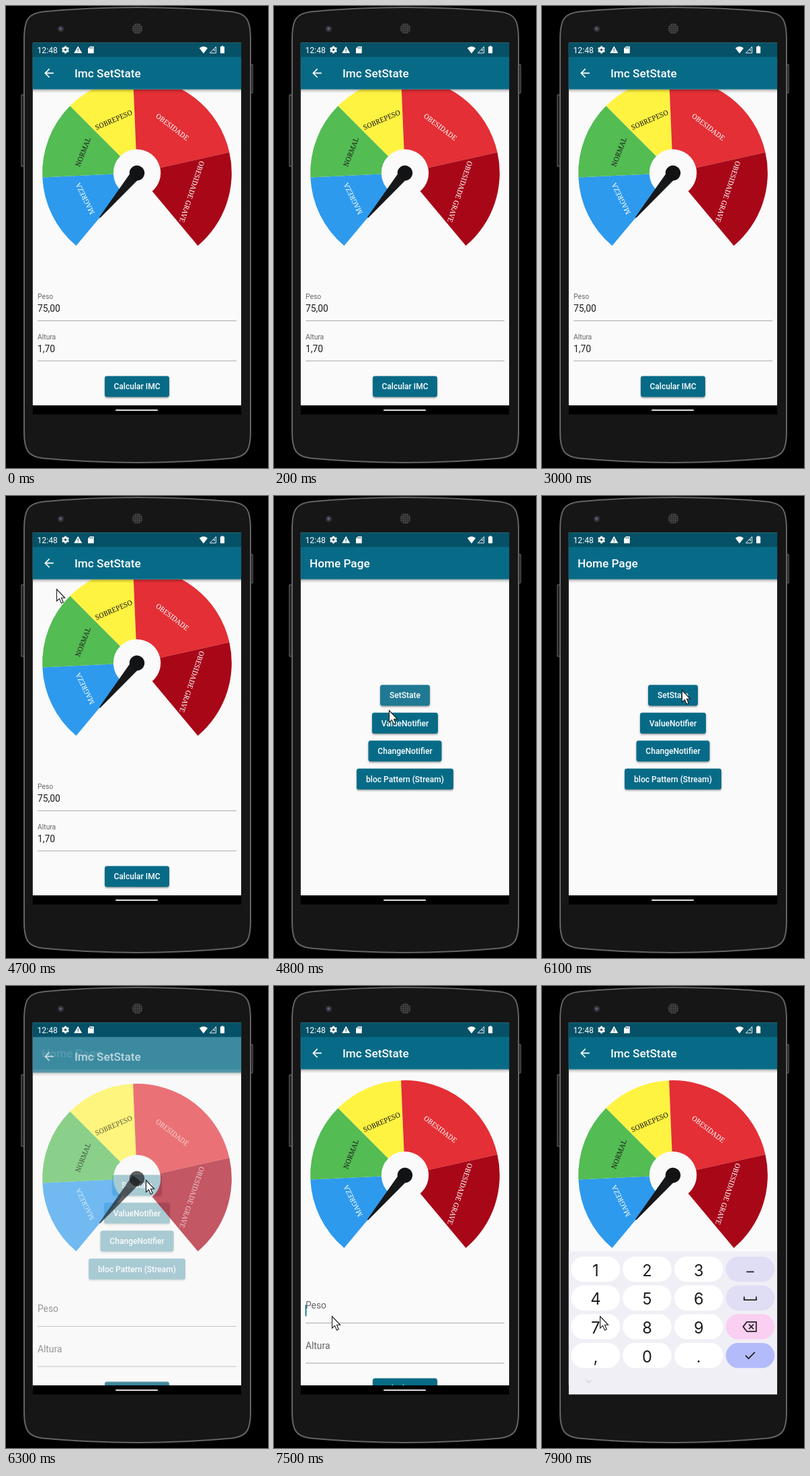
Animation of 390x686 px, one loop 8000 ms. Source, as an HTML page with a canvas:

```html
<!DOCTYPE html>
<html lang="pt">
<head>
<meta charset="utf-8">
<title>IMC</title>
<style>
html, body { margin: 0; width: 100%; height: 100%; overflow: hidden; background: #000; }
canvas { display: block; width: 390px; height: 686px; }
</style>
</head>
<body>
<canvas id="stage"></canvas>
<script>
const W = 390, H = 686, LOOP = 8000, STEP = 100;
const canvas = document.getElementById('stage');
const ratio = window.devicePixelRatio || 1;
canvas.width = W * ratio;
canvas.height = H * ratio;
const ctx = canvas.getContext('2d');

const TEAL = '#076b87', STATUS = '#055167', PAPER = '#fafafa', INK = '#1c1c1c';
const SCREEN = { x: 39.6, y: 54.4, w: 310.6, h: 552 };
const BAR_END = 123.7;
const rad = deg => deg * Math.PI / 180;
const clamp = v => Math.max(0, Math.min(1, v));
const easeOut = v => 1 - (1 - v) ** 3;
const mix = (a, b, p) => a + (b - a) * p;

function rect(x, y, w, h, color) {
  ctx.fillStyle = color;
  ctx.fillRect(x, y, w, h);
}

function band(y, h, color) {
  rect(SCREEN.x, y, SCREEN.w, h, color);
}

function roundRect(x, y, w, h, r, color) {
  ctx.beginPath();
  ctx.roundRect(x, y, w, h, r);
  ctx.fillStyle = color;
  ctx.fill();
}

function disc(x, y, r, color) {
  ctx.beginPath();
  ctx.arc(x, y, r, 0, 7);
  ctx.fillStyle = color;
  ctx.fill();
}

function polygon(points, color) {
  ctx.beginPath();
  points.forEach(([x, y]) => ctx.lineTo(x, y));
  ctx.closePath();
  ctx.fillStyle = color;
  ctx.fill();
}

function polyline(points, color, width) {
  ctx.beginPath();
  points.forEach(([x, y]) => ctx.lineTo(x, y));
  ctx.strokeStyle = color;
  ctx.lineWidth = width;
  ctx.stroke();
}

function text(str, x, y, size, color, { weight = 400, align = 'left', family = 'Roboto, sans-serif' } = {}) {
  ctx.font = `${weight} ${size}px ${family}`;
  ctx.textAlign = align;
  ctx.fillStyle = color;
  ctx.fillText(str, x, y);
}

function clipped(x, y, w, h, draw) {
  ctx.save();
  ctx.beginPath();
  ctx.rect(x, y, w, h);
  ctx.clip();
  draw();
  ctx.restore();
}

// Phone body

function drawPhone() {
  rect(0, 0, W, H, '#000');
  roundRect(22, 131, 7, 108, 2, '#4a4a4a');
  roundRect(23.5, 133, 3, 104, 1, '#222');
  roundRect(361, 86, 7, 44, 2, '#4a4a4a');
  roundRect(364, 88, 2.5, 40, 1, '#222');

  ctx.beginPath();
  ctx.moveTo(27, 50);
  ctx.bezierCurveTo(27, 20, 33, 11, 55, 8.5);
  ctx.quadraticCurveTo(195.5, -4.5, 336, 8.5);
  ctx.bezierCurveTo(358, 11, 364, 20, 364, 50);
  ctx.lineTo(364, 632);
  ctx.bezierCurveTo(364, 660, 358, 669, 336, 671.5);
  ctx.quadraticCurveTo(195.5, 684.5, 55, 671.5);
  ctx.bezierCurveTo(33, 669, 27, 660, 27, 632);
  ctx.closePath();
  ctx.fillStyle = '#161616';
  ctx.fill();
  ctx.strokeStyle = '#646464';
  ctx.lineWidth = 2;
  ctx.stroke();

  disc(81.5, 34, 5, '#2b2b2d');
  disc(81.5, 34, 3, '#3d4250');
  disc(81, 33.5, 1.3, '#69738a');
  disc(195.5, 33.5, 8, '#2a2a2a');
  for (let y = -6; y <= 6; y += 3)
    for (let x = -6; x <= 6; x += 3)
      if (x * x + y * y < 50) disc(195.5 + x, 33.5 + y, 0.9, '#555');
}

function drawStatus() {
  band(54, 21.7, STATUS);
  text('12:48', 46.5, 69.5, 12.2, '#fff');

  ctx.strokeStyle = '#fff';
  ctx.beginPath();
  ctx.arc(88.5, 65, 3.1, 0, 7);
  ctx.lineWidth = 2.6;
  ctx.stroke();
  for (let i = 0; i < 6; i++) {
    const a = rad(60 * i + 30), c = Math.cos(a), s = Math.sin(a);
    polyline([[88.5 + 3.5 * c, 65 + 3.5 * s], [88.5 + 5.5 * c, 65 + 5.5 * s]], '#fff', 2.6);
  }

  polygon([[101.2, 70], [107.2, 59.6], [113.2, 70]], '#fff');
  rect(106.6, 63.2, 1.2, 3.2, STATUS);
  rect(106.6, 67.4, 1.2, 1.2, STATUS);

  polygon([[122, 63], [125, 60], [130.7, 60], [130.7, 70.2], [122, 70.2]], '#fff');
  for (let i = 0; i < 3; i++) rect(124.6 + i * 1.8, 61.2, 0.9, 2, STATUS);

  ctx.beginPath();
  ctx.moveTo(294, 70.6);
  ctx.lineTo(287.8, 62.6);
  ctx.quadraticCurveTo(294, 57.6, 300.2, 62.6);
  ctx.closePath();
  ctx.fillStyle = '#fff';
  ctx.fill();

  polyline([[303.4, 69.8], [312.6, 69.8], [312.6, 60.4], [303.4, 69.8]], '#fff', 0.9);
  rect(309.4, 64, 1.2, 3, '#fff');
  roundRect(319, 60.3, 6.2, 10, 0.8, '#fff');
  rect(320.8, 59.2, 2.6, 1.4, '#fff');
}

function drawNavBar() {
  band(593, 14, '#000');
  roundRect(163, 599.3, 63, 1.8, 0.9, '#fff');
}

// Pages

function drawAppBar(title, back) {
  const shade = ctx.createLinearGradient(0, BAR_END, 0, BAR_END + 6);
  shade.addColorStop(0, 'rgba(0,0,0,.36)');
  shade.addColorStop(0.4, 'rgba(0,0,0,.12)');
  shade.addColorStop(1, 'rgba(0,0,0,0)');
  band(BAR_END, 6, shade);
  band(54, BAR_END - 54, TEAL);
  if (back) {
    polyline([[70.8, 99.7], [58.5, 99.7]], '#fff', 1.7);
    polyline([[64.6, 93.4], [58.3, 99.7], [64.6, 106]], '#fff', 1.7);
  }
  text(title, back ? 102 : 53, 106.2, 17.2, '#fff', { weight: 500 });
}

function drawButton(label, y, width, color = TEAL) {
  ctx.save();
  ctx.shadowColor = 'rgba(0,0,0,.38)';
  ctx.shadowBlur = 3 * ratio;
  ctx.shadowOffsetY = 1.5 * ratio;
  roundRect(195 - width / 2, y, width, 31, 3.4, color);
  ctx.restore();
  text(label, 195, y + 19.8, 12.05, '#fff', { weight: 500, align: 'center' });
}

function drawHome(t) {
  band(54, 539, PAPER);
  const glow = t < 5400 ? 1 - (t - 4800) / 600 : 0;
  const first = `rgb(${mix(7, 32, glow)},${mix(107, 121, glow)},${mix(135, 147, glow)})`;
  drawButton('SetState', 280.4, 74, first);
  drawButton('ValueNotifier', 321.8, 98);
  drawButton('ChangeNotifier', 363.2, 109);
  drawButton('bloc Pattern (Stream)', 404.8, 144);
  drawAppBar('Home Page', false);
}

// Each range ends at the given angle and starts where the previous one ended.
const RANGES = [
  ['MAGREZA', 177.4, '#2d9aee', '#fff'],
  ['NORMAL', 225, '#53bc53', INK],
  ['SOBREPESO', 267.6, '#fff341', INK],
  ['OBESIDADE', 347.4, '#e32f35', '#fff'],
  ['OBESIDADE GRAVE', 410, '#a80718', '#fff']
];

function drawGauge(cy) {
  const outer = 140.9, inner = 35.2;
  ctx.save();
  ctx.translate(195, cy);
  let from = 130;
  for (const [label, to, color, ink] of RANGES) {
    ctx.beginPath();
    ctx.arc(0, 0, outer, rad(from), rad(to));
    ctx.arc(0, 0, inner, rad(to), rad(from), true);
    ctx.closePath();
    ctx.fillStyle = color;
    ctx.fill();
    ctx.save();
    ctx.rotate(rad((from + to) / 2 + 90));
    text(label, 0, -82.5, 10.33, ink, { align: 'center', family: '"Noto Serif", serif' });
    ctx.restore();
    from = to;
  }
  ctx.rotate(rad(130));
  polygon([[0, -8], [86.5, -0.8], [86.5, 0.8], [0, 8]], '#17181a');
  disc(0, 0, 11.2, '#121315');
  ctx.restore();
}

function drawField(label, value, line, float, focused) {
  const active = focused && float > 0;
  text(label, 47, line - mix(21, 32, float), mix(13.8, 10.33, float), active ? TEAL : '#666');
  if (value) text(value, 47, line - 13.2, 13.8, '#1d1d1d');
  if (focused) rect(46.6, line - 27, 1.7, 17, TEAL);
  rect(47, line - 0.5, 296, active ? 1.7 : 1, active ? TEAL : '#a8a8a8');
}

function drawImc(t) {
  const filled = t < 4800;
  const scroll = filled ? 33 : 0;
  const focused = t >= 7500;
  const float = filled ? 1 : clamp((t - 7500) / 200);
  band(54, 539, PAPER);
  clipped(SCREEN.x, BAR_END, SCREEN.w, 593 - BAR_END, () => {
    drawGauge(281 - scroll);
    drawField('Peso', filled && '75,00', 500.4 - scroll, float, focused);
    drawField('Altura', filled && '1,70', 560 - scroll, filled ? 1 : 0, false);
    drawButton('Calcular IMC', 582.5 - scroll, 96);
  });
  drawAppBar('Imc SetState', true);
}

// Keyboard

function drawKeyboard(shift) {
  ctx.save();
  ctx.translate(0, shift);
  band(394, 213, '#f1eff6');
  const rows = ['123-', '456_', '789<', ',0.>'];
  const accents = { '-': '#dfdef5', _: '#dfdef5', '<': '#f9cff2', '>': '#b4bbfa' };
  rows.forEach((row, r) => [...row].forEach((key, c) => {
    const x = 43.5 + c * 76.7, y = 401.8 + r * 42.7;
    const cx = x + 36.3, cy = y + 18.7;
    roundRect(x, y, 72.6, 37.4, 18.7, accents[key] || '#fff');
    if (!accents[key]) text(key, cx, cy + 10, 23.6, '#1c1b20', { align: 'center', family: 'Inter, sans-serif' });
    if (key === '-') rect(cx - 5.5, cy + 3, 11, 1.8, '#222');
    if (key === '_') polyline([[cx - 9, cy - 2], [cx - 9, cy + 3], [cx + 9, cy + 3], [cx + 9, cy - 2]], '#222', 1.8);
    if (key === '<') {
      polyline([[cx - 10.5, cy], [cx - 5, cy - 7], [cx + 9, cy - 7], [cx + 9, cy + 7], [cx - 5, cy + 7], [cx - 10.5, cy], [cx - 5, cy - 7]], '#222', 1.7);
      polyline([[cx - 2, cy - 3.5], [cx + 5, cy + 3.5]], '#222', 1.7);
      polyline([[cx + 5, cy - 3.5], [cx - 2, cy + 3.5]], '#222', 1.7);
    }
    if (key === '>') polyline([[cx - 7, cy], [cx - 2.4, cy + 4.6], [cx + 7, cy - 5]], '#222', 1.8);
  }));
  polyline([[65.5, 585.5], [69.5, 589], [73.5, 585.5]], '#d0ced6', 1.3);
  ctx.restore();
}

// Pointer: [time, x, y]; an entry without a place hides it.
const PATH = [
  [0], [3400, 198, 288], [3500, 172, 340], [3600, 125, 376], [3700, 83, 406], [3800],
  [4100, 25, 118], [4200, 48, 106], [4300, 59, 101], [4600, 59, 101], [4700, 75, 138],
  [4800, 171, 318], [4900, 192, 301], [5000, 203, 291], [5500, 205, 289], [5600, 208, 288],
  [6800, 208, 288], [6900, 180, 362], [7000, 118, 460], [7100, 86, 490], [8000, 86, 490]
];

function drawPointer(t) {
  const i = PATH.findLastIndex(k => k[0] <= t);
  const [t0, x0, y0] = PATH[i];
  if (x0 === undefined) return;
  const [t1, x1 = x0, y1 = y0] = PATH[i + 1] || PATH[i];
  const p = t1 > t0 ? (t - t0) / (t1 - t0) : 0;
  ctx.save();
  ctx.translate(mix(x0, x1, p), mix(y0, y1, p));
  polygon([[0.5, 0.5], [0.5, 18], [4.5, 14.4], [7.4, 21], [10.2, 19.8], [7.4, 13.3], [12.6, 13.3]], '#fff');
  ctx.strokeStyle = '#1c1c1c';
  ctx.lineWidth = 1.1;
  ctx.stroke();
  ctx.restore();
}

function drawScreen(t) {
  const opening = clamp((t - 6100) / 300);
  if (t >= 4800 && opening < 1) drawHome(t);
  if (t < 4800 || opening === 1) drawImc(t);
  else if (opening > 0) {
    ctx.save();
    ctx.globalAlpha = opening;
    ctx.translate(0, 135 * (1 - easeOut(opening)));
    drawImc(t);
    ctx.restore();
  }
  drawStatus();
  drawNavBar();
  const rise = clamp((t - 7600) / 250);
  if (rise > 0) drawKeyboard(212 * (1 - easeOut(rise)));
}

function frame() {
  const t = Math.floor((performance.now() % LOOP) / STEP) * STEP;
  ctx.setTransform(ratio, 0, 0, ratio, 0, 0);
  drawPhone();
  clipped(SCREEN.x, SCREEN.y, SCREEN.w, SCREEN.h, () => drawScreen(t));
  drawPointer(t);
  requestAnimationFrame(frame);
}

frame();
</script>
</body>
</html>
```
